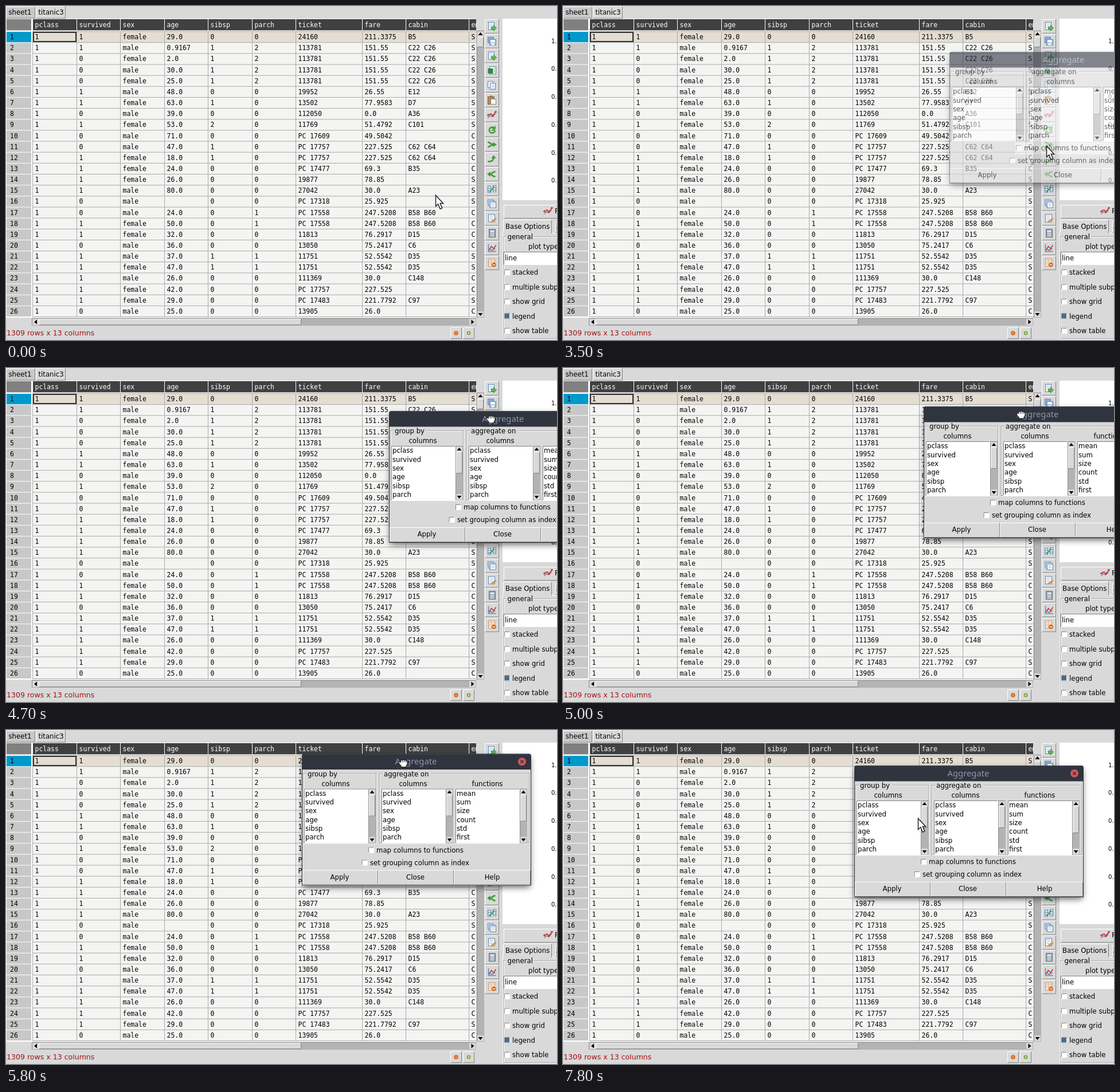
An HTML page for the animation above (8 s loop, 961 px wide and 583 px high).

```html
<!DOCTYPE html>
<html lang="en">
<head>
<meta charset="utf-8">
<title>Table aggregation</title>
<style>
html, body { margin: 0; width: 100%; height: 100%; overflow: hidden; background: #d9d9d9; }
svg { display: block; width: 961px; height: 583px; }
text { font: 11.7px "DejaVu Sans", sans-serif; fill: #000; white-space: pre; }
text.mono { font: 11.45px "DejaVu Sans Mono", monospace; }
text.title { font: 14.8px "Noto Sans", sans-serif; fill: #8f97a5; }
text.tip { font-size: 10.3px; }
text.status { font-size: 12.55px; fill: #a01414; }
text.tick { font: 10px "DejaVu Sans", sans-serif; }
</style>
</head>
<body>
<svg id="stage" viewBox="0 0 961 583" xmlns="http://www.w3.org/2000/svg">
  <defs>
    <filter id="blur" x="-20%" y="-20%" width="140%" height="140%"><feGaussianBlur stdDeviation="6"/></filter>
    <clipPath id="tableClip"><rect x="0" y="22" width="820" height="522"/></clipPath>
  </defs>
</svg>
<script>
const NS = 'http://www.w3.org/2000/svg';
const stage = document.getElementById('stage');

function add(parent, tag, attrs, content) {
  const el = document.createElementNS(NS, tag);
  for (const k in attrs) el.setAttribute(k, attrs[k]);
  if (content !== undefined) el.textContent = content;
  return parent.appendChild(el);
}
const group = (parent, attrs = {}) => add(parent, 'g', attrs);
const rect = (p, x, y, width, height, fill, extra) => add(p, 'rect', { x, y, width, height, fill, ...extra });
const path = (p, d, stroke, width = 1, fill = 'none') =>
  add(p, 'path', { d, stroke, 'stroke-width': width, fill });
// y is the middle of the capitals
const label = (p, x, y, str, cls = '', extra = {}) => add(p, 'text', { x, y: y + 4.2, class: cls, ...extra }, str);
const centred = (p, x, y, str, cls) => label(p, x, y, str, cls, { 'text-anchor': 'middle' });

function bevel(p, x, y, w, h, fill = '#d9d9d9', sunken = false) {
  const box = rect(p, x, y, w, h, fill);
  const a = x + .5, b = y + .5, c = x + w - .5, d = y + h - .5;
  path(p, `M${a} ${d}V${b}H${c}`, sunken ? '#828282' : '#fff');
  path(p, `M${a} ${d}H${c}V${b}`, sunken ? '#fff' : '#828282');
  return box;
}

function frame(p, x, y, w, h, title, tx, tw) {
  rect(p, x + .5, y + .5, w, h, 'none', { stroke: '#fff' });
  rect(p, x - .5, y - .5, w, h, 'none', { stroke: '#a3a3a3' });
  rect(p, tx - 2, y - 5, tw + 4, 10, '#d9d9d9');
  label(p, tx, y, title);
}

function checkbox(p, x, y, str, tx, on) {
  bevel(p, x - 5, y - 5, 10, 10, on ? '#4a6a8c' : '#fff', true);
  label(p, tx, y, str);
}

function vScroll(p, x, y, h, from, to) {
  rect(p, x, y, 13, h, '#b3b3b3');
  path(p, `M${x + .5} ${y + h}V${y + .5}H${x + 13}`, '#8a8a8a');
  rect(p, x + 1, y + 1, 11, 10, '#d9d9d9');
  rect(p, x + 1, y + h - 11, 11, 10, '#d9d9d9');
  path(p, `M${x + 2.5} ${y + 8}h8l-4 -5z`, 'none', 0, '#000');
  path(p, `M${x + 2.5} ${y + h - 8}h8l-4 5z`, 'none', 0, '#000');
  bevel(p, x + 1, from, 11, to - from);
}

// ---- spreadsheet ----
const COLS = [46, 123, 199, 276, 352, 429, 505, 621, 697, 807];
const HEADS = 'pclass,survived,sex,age,sibsp,parch,ticket,fare,cabin,embarked'.split(',');
const ROWS = `1,f,29.0,0,0,24160,211.3375,B5,S
1,m,0.9167,1,2,113781,151.55,C22 C26,S
0,f,2.0,1,2,113781,151.55,C22 C26,S
0,m,30.0,1,2,113781,151.55,C22 C26,S
0,f,25.0,1,2,113781,151.55,C22 C26,S
1,m,48.0,0,0,19952,26.55,E12,S
1,f,63.0,1,0,13502,77.9583,D7,S
0,m,39.0,0,0,112050,0.0,A36,S
1,f,53.0,2,0,11769,51.4792,C101,S
0,m,71.0,0,0,PC 17609,49.5042,,C
0,m,47.0,1,0,PC 17757,227.525,C62 C64,C
1,f,18.0,1,0,PC 17757,227.525,C62 C64,C
1,f,24.0,0,0,PC 17477,69.3,B35,C
1,f,26.0,0,0,19877,78.85,,S
1,m,80.0,0,0,27042,30.0,A23,S
0,m,,0,0,PC 17318,25.925,,S
0,m,24.0,0,1,PC 17558,247.5208,B58 B60,C
1,f,50.0,0,1,PC 17558,247.5208,B58 B60,C
1,f,32.0,0,0,11813,76.2917,D15,C
0,m,36.0,0,0,13050,75.2417,C6,C
1,m,37.0,1,1,11751,52.5542,D35,S
1,f,47.0,1,1,11751,52.5542,D35,S
1,m,26.0,0,0,111369,30.0,C148,C
1,f,42.0,0,0,PC 17757,227.525,,C
1,f,29.0,0,0,PC 17483,221.7792,C97,S
0,m,25.0,0,0,13905,26.0,,C`.split('\n').map(r => ['1', ...r.split(',')]);
const TOP = 44.6, STEP = 19.15, BOTTOM = TOP + STEP * 26;
const SEX = { f: 'female', m: 'male' };

function drawTable(root) {
  const g = group(root, { 'clip-path': 'url(#tableClip)' });
  rect(g, 0, 22, 820, 522, '#fff');
  rect(g, 1, 23, 43, 19.5, '#808080');
  rect(g, 46, 23, 774, 19.5, '#404040');
  rect(g, 46, TOP, 774, BOTTOM - TOP, '#f4f4f3');
  rect(g, 46, TOP, 774, STEP, '#e4ddd2');
  rect(g, 1, TOP, 43, BOTTOM - TOP, '#c8c8c8');
  rect(g, 1, TOP, 43, STEP, '#0099cc');
  for (let i = 0; i <= 26; i++) {
    const y = TOP + STEP * i;
    path(g, `M46 ${y}H820`, '#a9a9a9');
    path(g, `M1 ${y}H44`, '#fff');
  }
  COLS.forEach((x, c) => {
    path(g, `M${x + .5} ${TOP}V${BOTTOM}`, '#a9a9a9');
    path(g, `M${x + .5} 23V42.5`, '#fff');
    label(g, x + 4.5, 33, HEADS[c], 'mono', { style: 'fill:#fff' });
  });
  ROWS.forEach((row, r) => {
    const y = TOP + STEP * (r + .5) - .2;
    label(g, 7, y, r + 1, 'mono');
    row.forEach((v, c) => v && label(g, COLS[c] + 4.5, y, c === 2 ? SEX[v] : v, 'mono'));
  });
  rect(g, 48, 46, 74, 16, 'none', { stroke: '#333', 'stroke-width': 2 });
}

function drawSheet(root) {
  bevel(root, 0, 1, 51, 21, '#c8c8c8');
  bevel(root, 52, 0, 52, 22, '#d9d9d9');
  label(root, 4.5, 11, 'sheet1');
  label(root, 56.5, 11, 'titanic3');
  drawTable(root);
  vScroll(root, 821, 43, 501, 54, 72);
  rect(root, 45, 545, 775, 13, '#b3b3b3');
  path(root, 'M45.5 558V545.5H820', '#8a8a8a');
  rect(root, 46, 546, 11, 11, '#d9d9d9');
  rect(root, 808, 546, 11, 11, '#d9d9d9');
  path(root, 'M54 547.5v8l-5 -4z', 'none', 0, '#000');
  path(root, 'M811.500 547.500v8l5 -4z', 'none', 0, '#000');
  bevel(root, 57, 546, 458, 11);
  label(root, 1, 571, '1309 rows x 13 columns', 'status');
  [[775, '#e0641c', 3], [797, '#6c9a2c', 2.5]].forEach(([x, stroke, r]) => {
    bevel(root, x, 561, 20, 20);
    add(root, 'circle', { cx: x + 10, cy: 571, r, fill: r === 3 ? '#f0883c' : '#d9e8b8', stroke, 'stroke-width': 1.6 });
  });
}

// ---- toolbar icons, drawn around 0,0 ----
const GREEN = '#3f9b35', BLUE = '#5b87b8', RED = '#d2322d', ORANGE = '#e88a22';
const page = (g, x = -6, y = -7, w = 10, h = 13, edge = BLUE) => rect(g, x, y, w, h, '#f4f8fc', { stroke: edge });
const lines = (g, c = '#a9bfd6') => path(g, 'M-4 -4h6M-4 -1h6M-4 2h6', c);
const greenArrow = g => path(g, 'M-1 1h4v-3l5 5l-5 5v-3h-4z', '#2f7d2a', .8, '#62b956');
const curve = (g, d, head) => { path(g, d, GREEN, 2.6); path(g, head, GREEN, .5, GREEN); };
const ICONS = [
  g => { page(g); lines(g); greenArrow(g); },
  g => {
    rect(g, -7, -7, 10, 10, '#8fb0d4', { stroke: BLUE });
    rect(g, -4, -3, 11, 10, '#a9c4e2', { stroke: BLUE });
    rect(g, -2, -2, 7, 4, '#fff'); rect(g, -1, 4, 5, 3, '#fff');
  },
  g => { page(g); lines(g); greenArrow(g); },
  g => { page(g, -4, -7, 11, 13); rect(g, -7, -4, 9, 9, '#2f8a44'); path(g, 'M3.500 -4h2M3.500 -1h2M3.500 2h2', GREEN); },
  g => { page(g, -7, -7, 9, 11); page(g, -3, -4, 9, 11); path(g, 'M-1 -1h5M-1 2h5M-1 5h5', '#a9bfd6'); },
  g => { rect(g, -7, -6, 11, 13, '#c08a45', { stroke: '#86592a' }); rect(g, -4, -8, 5, 3, '#777'); page(g, -2, -2, 9, 9, '#8a8a8a'); },
  g => { path(g, 'M-7 5L-3 1L1 3L6 -2', BLUE, 1.5); path(g, 'M-7 0L-2 -2L2 1L7 -6', RED, 1.8); path(g, 'M-8 -1h3v3h-3zM0 0h3v3h-3zM5 -7h3v3h-3z', 'none', 0, RED); },
  g => { curve(g, 'M4 -3A5 5 0 1 0 4 4', 'M0 -1h6v-6z'); path(g, 'M0 1h5v4', GREEN, 2); },
  g => { curve(g, 'M-7 -4C-2 -4 -3 0 3 0M-7 4C-2 4 -3 0 3 0', 'M2 -4l6 4l-6 4z'); },
  g => { curve(g, 'M-7 4C0 4 3 2 3 -3', 'M-1 -2h8l-4 -5z'); },
  g => { curve(g, 'M6 -4C1 -5 1 0 -4 0M6 4C1 5 1 0 -4 0', 'M-3 -4l-5 4l5 4z'); },
  g => { rect(g, -7, -5, 5, 11, '#dbe8f5', { stroke: BLUE }); rect(g, 2, -6, 5, 11, '#dbe8f5', { stroke: BLUE }); path(g, 'M-7 -1h5M-7 3h5M2 -2h5M2 2h5', BLUE); path(g, 'M-4 5L4 -4', GREEN, 2); },
  g => { page(g, -7, -7, 9, 9); page(g, -5, -5, 10, 10); page(g, -3, -3, 10, 10); path(g, 'M-1 0h6M-1 3h6', '#a9bfd6'); },
  g => { page(g, -6, -7, 11, 13); lines(g); path(g, 'M-1 6L7 0', ORANGE, 3); },
  g => { rect(g, -5, -7, 11, 14, '#8e9cab', { stroke: '#657383' }); rect(g, -3, -5, 7, 3, '#e6eef5'); path(g, 'M-3 0h7M-3 2.500h7M-3 5h7', '#eee', 1.3); },
  g => { path(g, 'M-6 -7V6H7', BLUE, 1.4); path(g, 'M-5 4L-1 -3L3 1L7 -5', RED, 1.6); path(g, 'M-5 0L0 4L6 1', BLUE, 1.5); },
  g => { rect(g, -6, -7, 11, 13, '#f7f1e8', { stroke: '#c99563' }); path(g, 'M-6 -4h11M-6 -1h11M-6 2h11M-1 -7v13', '#d9b58d'); add(g, 'circle', { cx: 3.500, cy: 3.500, r: 3.800, fill: '#e0641c' }); path(g, 'M1.500 3.500h4', '#fff', 1.4); }
];
let hotButton;

function drawToolbar(root) {
  ICONS.forEach((icon, i) => {
    const y = 35.5 + 25.8 * i;
    const box = bevel(root, 835, y - 12.5, 25, 25);
    if (i === 8) hotButton = box;
    icon(group(root, { transform: `translate(847.5 ${y})` }));
  });
}

function drawPlotPanel(root) {
  rect(root, 866, 22, 95, 317, '#fff');
  ['1.0', '0.8', '0.6', '0.4', '0.2', '0.0'].forEach((s, i) => label(root, 951, 60.5 + 48.7 * i, s, 'tick'));
  bevel(root, 868, 347, 110, 24);
  ICONS[6](group(root, { transform: 'translate(945.5 358)' }));
  label(root, 957, 358, 'Plot');
  rect(root, 866.5, 396.5, 120, 220, '#d9d9d9', { stroke: '#fff' });
  bevel(root, 958, 376, 40, 20, '#c8c8c8');
  bevel(root, 867, 373, 85, 24);
  rect(root, 868, 395, 83, 3, '#d9d9d9');
  label(root, 871, 384.5, 'Base Options');
  label(root, 960, 384.5, 'Annotation');
  frame(root, 868, 403, 110, 178, 'general', 874.5, 44);
  label(root, 911, 420, 'plot type');
  bevel(root, 868, 429, 110, 23, '#fff', true);
  label(root, 870, 440, 'line');
  ['stacked', 'multiple subplots', 'show grid', 'legend', 'show table'].forEach((s, i) =>
    checkbox(root, 874, 465 + 25.5 * i, s, 883, i === 3));
}

// ---- dialog, drawn from its own top left corner ----
let hotCheck;

function listbox(g, x, items, thumbEnd) {
  bevel(g, x, 61, 112, 95, '#fff', true);
  items.forEach((s, i) => label(g, x + 2, 69 + 15.35 * i, s));
  vScroll(g, x + 112, 61, 95, 71, thumbEnd);
}

function drawDialog(root) {
  const g = group(root);
  rect(g, 2, 6, 396, 227, '#000', { filter: 'url(#blur)', opacity: .6 });
  path(g, 'M0 230V4Q0 0 4 0H396Q400 0 400 4V230Z', 'none', 0, '#2f343f');
  rect(g, 1, 27.5, 398, 201.5, '#d9d9d9');
  path(g, 'M4 .8H396', '#4a505c', .8);
  centred(g, 199, 14.3, 'Aggregate', 'title');
  add(g, 'circle', { cx: 384, cy: 13.7, r: 7, fill: '#cc575d' });
  path(g, 'M381.500 11.200l5 5m0 -5l-5 5', '#2f343f', 1.6);
  frame(g, 3, 35, 127, 121, 'group by', 10, 54);
  frame(g, 135.5, 35, 262, 121, 'aggregate on', 143, 80);
  centred(g, 59, 52, 'columns');
  centred(g, 194, 52, 'columns');
  centred(g, 323.5, 52, 'functions');
  const cols = HEADS.slice(0, 6);
  listbox(g, 4, cols, 109);
  listbox(g, 139, cols, 109);
  listbox(g, 268, ['mean', 'sum', 'size', 'count', 'std', 'first'], 118);
  hotCheck = rect(g, 114, 158, 172, 21, '#ececec');
  checkbox(g, 121, 168, 'map columns to functions', 130);
  checkbox(g, 109.500, 190, 'set grouping column as index', 119);
  [['Apply', 1, 66], ['Close', 133, 198], ['Help', 265, 332]].forEach(([s, x, mid]) => {
    bevel(g, x, 203, x > 200 ? 134 : 132, 26);
    centred(g, mid, 215, s);
  });
  return g;
}

function drawTip(root) {
  const g = group(root);
  rect(g, 859.5, 239.5, 57, 14, '#ffffe0', { stroke: '#000' });
  label(g, 861, 246.2, 'aggregate', 'tip');
  return g;
}

function drawHand(root) {
  const g = group(root);
  path(g, 'M-4 7V5L-7.500 1.500V-1.500Q-6 -3 -4.500 -1.500V-4Q-3 -6 -1.500 -4.500Q0 -6.500 1.500 -4.500Q3 -6 4.500 -4Q6.500 -4.500 7 -2.500V2L5 5V7Z', '#222', 1.2, '#fff');
  path(g, 'M-1.500 -4v3M1.500 -4v3M4.500 -3.500v2.500', '#222', 1);
  return g;
}

drawSheet(stage);
drawToolbar(stage);
drawPlotPanel(stage);
const dialog = drawDialog(stage);
const tip = drawTip(stage);
const arrow = group(stage);
path(arrow, 'M.5 .5V19.500L4.700 15.700L8.200 24.200L11.700 22.700L8.300 14.500H13.600Z', '#222', 1.5, '#fff');
const hand = drawHand(stage);

// ---- timeline: [ms, x, y], each pose held until the next ----
const WINDOW = [[3500, 674, 80], [4700, 668, 75], [4800, 662, 71], [5000, 629, 67], [5100, 595, 52],
  [5300, 570, 46], [5500, 543, 42], [5600, 526, 44], [5800, 516, 41.5], [6200, 508, 62]];
const POINTER = [[0, 749, 330], [1700, 843, 244], [3900, 850, 205], [4000, 856, 168], [4200, 858, 136],
  [4300, 857, 112], [4400, 857, 99], [6500, 683, 76], [6700, 698, 106], [6800, 712, 132],
  [7000, 718, 144], [7700, 655, 151], [7800, 619, 154]];
const GRIP = [[4600, 178, 14], [5000, 170, 14], [5300, 172, 15], [5800, 177, 16], [6200, 182, 18]];

const held = (keys, t) => keys.filter(k => k[0] <= t).pop() || keys[0];
const show = (el, on) => el.setAttribute('display', on ? 'inline' : 'none');
const move = (el, x, y) => el.setAttribute('transform', `translate(${x} ${y})`);
const ease = p => p * p * (3 - 2 * p);

function update(ms) {
  const t = Math.floor(ms / 100) * 100;
  const [, wx, wy] = held(WINDOW, t);
  const dragging = t >= 4600 && t < 6500;
  let [, px, py] = held(POINTER, t);
  if (t >= 1100 && t < 1700) {
    const p = ease((t - 1000) / 700);
    px = 749 + 94 * p;
    py = 330 - 86 * p;
  }
  show(dialog, t >= 3500);
  dialog.setAttribute('opacity', t === 3500 ? .6 : 1);
  move(dialog, wx, wy);
  show(tip, t >= 1800 && t < 3500);
  show(arrow, !dragging);
  move(arrow, px, py);
  show(hand, dragging);
  const [, gx, gy] = held(GRIP, t);
  move(hand, wx + gx, wy + gy);
  hotButton.setAttribute('fill', t >= 1600 && t < 3500 ? '#ececec' : '#d9d9d9');
  show(hotCheck, t < 3900);
}

const start = performance.now();
function tick() {
  update((performance.now() - start) % 8000);
  requestAnimationFrame(tick);
}
tick();
</script>
</body>
</html>
```
